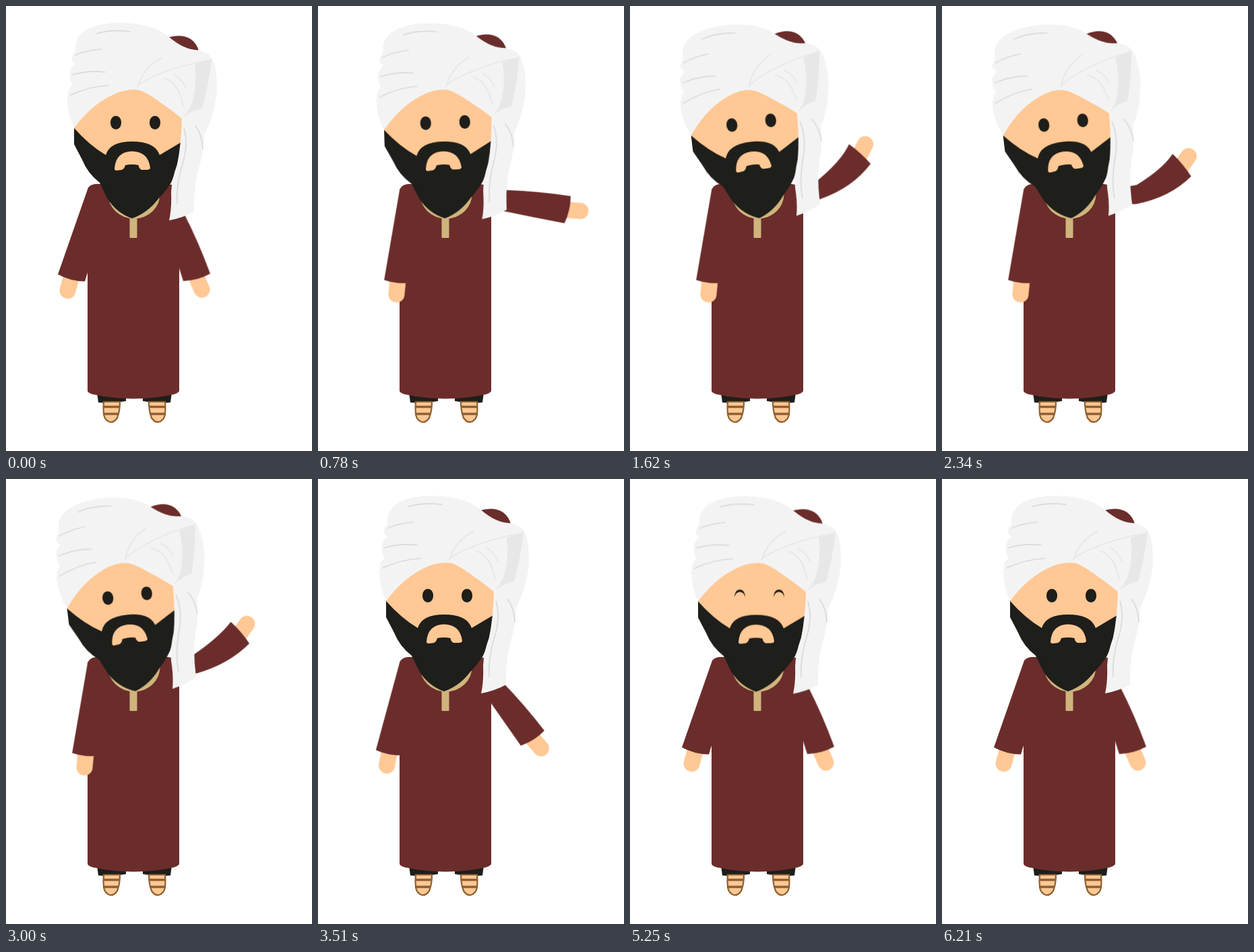
Recreate the animation shown at these times as an HTML page. Size 454x660 px, loop 6.6 s.

```html
<!DOCTYPE html>
<html lang="en">
<head>
<meta charset="utf-8">
<title>Waving man</title>
<style>
  html, body { margin: 0; width: 100%; height: 100%; overflow: hidden; background: #fff; }
  svg { display: block; width: 100vw; height: 100vh; }

  .robe { fill: #6b2d2b; }
  .skin { fill: #ffc895; }
  .dark { fill: #1e1e1b; }
  .tan { fill: #cfb47c; }
  .cloth { fill: #f3f3f3; }
  .shade { fill: #e7e7e7; }
  .folds { fill: none; stroke: #dadada; stroke-width: 1.7; stroke-linecap: round; }
  .folds .soft { stroke: #e6e6e6; }
  .hand { fill: none; stroke: #ffc895; stroke-width: 24; stroke-linecap: round; }
  .sole { fill: #ffc895; stroke: #8f6031; stroke-width: 2.2; }
  .straps { fill: none; stroke: #8f6031; stroke-width: 3.6; }

  .head, .left-arm, .right-arm, .right-arm path, .eye {
    animation: 6.6s cubic-bezier(.333, 0, .667, 1) infinite;
  }
  .head { animation-name: head; transform-origin: 187px 273px; }
  .left-arm { animation-name: left-arm; transform-origin: 138px 275px; }
  .right-arm { animation-name: right-arm; transform-origin: 0 0; }
  .right-arm .sleeve { animation-name: sleeve; }
  .right-arm .hand { animation-name: hand; }
  .eye { animation-name: blink; }

  /* tilt while waving, then a small nod */
  @keyframes head {
    0%, 5% { transform: translateY(0) rotate(0deg); }
    25%, 46.36% { transform: translateY(0) rotate(-6.9deg); }
    52.73%, 63.64% { transform: translateY(0) rotate(0deg); }
    71.5% { transform: translateY(3px) rotate(0deg); }
    82.27%, 100% { transform: translateY(0) rotate(0deg); }
  }
  @keyframes left-arm {
    0%, 4.55% { transform: rotate(0deg); }
    11.36%, 48.8% { transform: rotate(-9.5deg); }
    56.82%, 100% { transform: rotate(0deg); }
  }
  /* raise, one wave, lower */
  @keyframes right-arm {
    0%, 4.55% { transform: translate(0, 0) rotate(0deg); }
    16.36%, 24.55% { transform: translate(0, 0) rotate(-90deg); }
    32.12% { transform: translate(12px, 2.5px) rotate(-77deg); }
    40.3%, 43.94% { transform: translate(0, 0) rotate(-90deg); }
    56.82%, 100% { transform: translate(0, 0) rotate(0deg); }
  }
  @keyframes sleeve {
    0%, 10.91%, 51.52%, 100% {
      d: path("M4 -12L23 31Q44 72 61.5 119.5Q43.5 129.5 21.5 130.5Q7 85 -7 41L-14 6Z");
    }
    18.94%, 43.79% {
      d: path("M4 -12L19 37Q48 72 72.5 83.5Q60 101 43.5 115.5Q8 89 -9 40.5L-14 6Z");
    }
  }
  @keyframes hand {
    0%, 10.91%, 51.52%, 100% { d: path("M38 118L49 143"); }
    18.94%, 43.79% { d: path("M52 97L72.5 107.5"); }
  }
  @keyframes blink {
    0%, 53.64%, 94.09%, 100% { d: path("M-8 0C-8 -13.3 8 -13.3 8 0C8 13.3 -8 13.3 -8 0Z"); }
    56.82%, 87.73% { d: path("M-8 2C-8 -13.3 8 -13.3 8 2C6 -8.8 -6 -8.8 -8 2Z"); }
  }
</style>
</head>
<body>
<svg viewBox="0 0 454 660">
  <defs>
    <g id="leg">
      <path class="dark" d="M135 573H178V586Q157 590 137 588Z"/>
      <path class="sole" d="M145 587H169Q169 601 165 611Q160 618 154.5 617Q147 615 145 606Q144 596 145 587Z"/>
      <path class="straps" d="M144 594.5H169M144.5 605H167"/>
    </g>
  </defs>

  <use href="#leg"/>
  <use href="#leg" transform="matrix(-1 0 0 1 381 0)"/>

  <path class="robe" d="M121 276Q122 264 136 264H240Q257 265 257 284V571Q256 574 249 576Q190 589 129 576Q122 574 121 571Z"/>
  <ellipse class="tan" cx="190" cy="279" rx="38.5" ry="36.5"/>
  <rect class="tan" x="183.5" y="312" width="11" height="32" rx="1"/>

  <g class="left-arm">
    <path class="hand" d="M98 398L91.5 422"/>
    <path class="robe" d="M136 264Q123 264 121 272L77 398Q95 408 117 408.5L146 312Z"/>
  </g>

  <g transform="translate(241.5 277.5)">
    <g class="right-arm">
      <path class="hand" d="M38 118L49 143"/>
      <path class="robe sleeve" d="M4 -12L23 31Q44 72 61.5 119.5Q43.5 129.5 21.5 130.5Q7 85 -7 41L-14 6Z"/>
    </g>
  </g>

  <g class="head">
    <path class="skin" d="M101 178Q140 118 190 120Q235 125 264 165L259 208L210 240H160L101 186Z"/>
    <path class="dark" d="M101 181Q124 207 148 221Q154 201 187 201Q221 201 228 221L260 202Q255 240 245 262Q236 276 226 286Q210 307 187 315Q164 307 150 285L139 262Q121 248 113 228L101 205Z"/>
    <path class="skin" d="M161 241Q163 216 187 215.5Q211 216 214 240Q214 243 208 243H201Q197 241 196.5 236Q187 234 177 236Q176 241 172 243L164 244Q161 244 161 241Z"/>
    <g transform="translate(163 173)"><path class="eye dark" d="M-8 0C-8 -13.3 8 -13.3 8 0C8 13.3 -8 13.3 -8 0Z"/></g>
    <g transform="translate(221 173)"><path class="eye dark" d="M-8 0C-8 -13.3 8 -13.3 8 0C8 13.3 -8 13.3 -8 0Z"/></g>

    <path class="robe" d="M240 47C252 43 265 43 274 49Q284 56 287 70L258 68Z"/>
    <path class="cloth" d="M101 181Q91 160 91 138Q91 124 98 117Q93 107 95 97Q97 90 103 86Q92 78 103 67Q101 46 120 35Q150 20 196 27Q224 31 242 46Q264 65 285 65.5Q302 69 307 80Q314 96 313 125Q309 165 294 190Q294 215 286 240Q278 270 279 305Q263 314 242 318Q246 300 245 277Q246 256 254 235Q260 205 261 167Q244 153 226 141Q207 127 198 125Q178 121 152 135Q124 150 101 181Z"/>
    <path class="shade" d="M280 87L305 79Q301 115 291 152Q274 155 262 166Q273 155 277 140Q284 112 280 87Z"/>
    <g class="folds">
      <path d="M134 41Q157 34 184 38M103 73Q118 66 141 64M99 102Q121 95 147 98M96 132Q124 119 152 118"/>
      <path class="soft" d="M195 120Q204 91 231 77M197 116Q239 91 301 81M250 102Q262 110 267 122M236 107Q253 114 259 134L263 148"/>
      <path d="M264 181Q271 205 262 234Q252 268 254 293M281 178Q291 190 292 212"/>
    </g>
  </g>
</svg>
</body>
</html>
```
